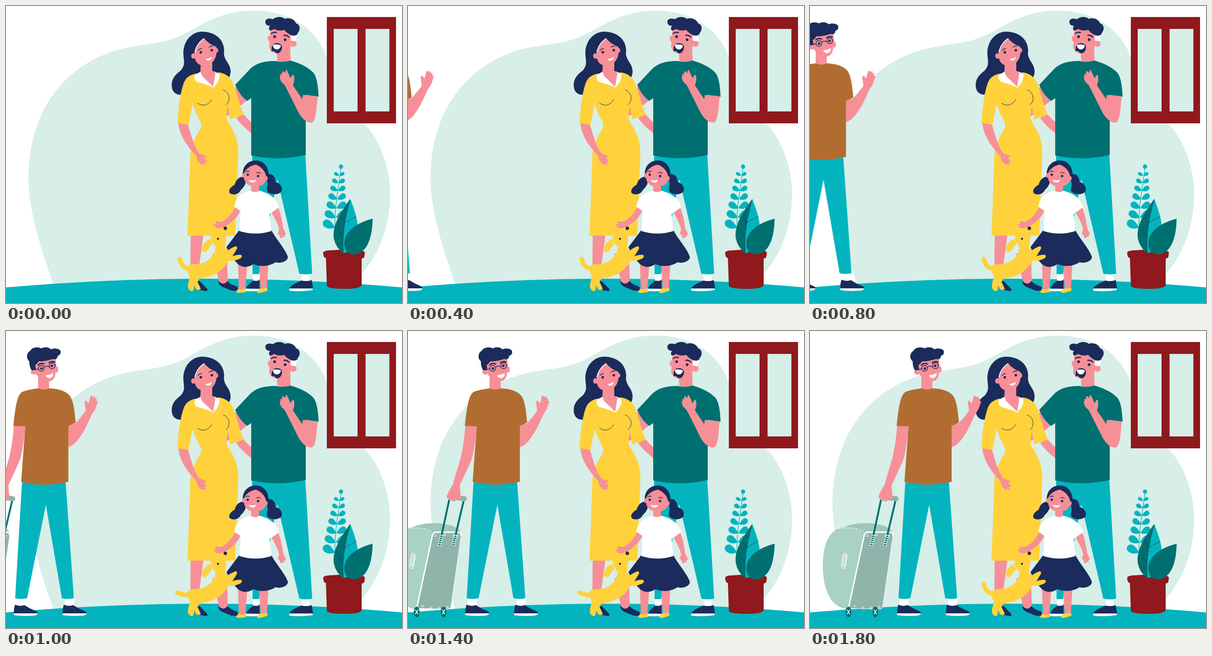
These frames come from a looping animation (864x648 px, 6.8 s). An HTML page:

```html
<!DOCTYPE html>
<html lang="en">
<head>
<meta charset="utf-8">
<title>Family welcome</title>
<style>
html, body { margin: 0; width: 100%; height: 100%; overflow: hidden; background: #fff; }
svg { display: block; width: 100%; height: 100%; }
.mint { fill: #d7eee9; }
.cyan { fill: #03b4be; }
.teal { fill: #006f70; }
.navy { fill: #1b2b5b; }
.red { fill: #8f191c; }
.gold { fill: #ffd23c; }
.brown { fill: #b16d31; }
.white { fill: #fff; }
.skin { fill: #f78f97; }
.sage { fill: #8fb5ab; }
.lid { fill: #9fc6bb; }
.pale { fill: #a9d2c7; }
.line { fill: none; stroke: #1b2b5b; stroke-linecap: round; }
.trim { fill: none; stroke: #fff; }
.tail { fill: none; stroke: #ffd23c; stroke-width: 10; stroke-linecap: round; }
#guest { animation: arrive 6800ms step-end infinite; }
.up { animation: wag-up 6800ms step-end infinite; }
.down { animation: wag-down 6800ms step-end infinite; }
@keyframes arrive {
  0% { transform: translateX(-376px); }
  2.94% { transform: translateX(-352px); }
  5.88% { transform: translateX(-317px); }
  8.82% { transform: translateX(-276px); }
  11.76% { transform: translateX(-230.5px); }
  14.7% { transform: translateX(-173px); }
  17.64% { transform: translateX(-115px); }
  20.58% { transform: translateX(-65px); }
  23.52% { transform: translateX(-22px); }
  26.47%, 100% { transform: translateX(0); }
}
@keyframes wag-up {
  0%, 5.88%, 11.76%, 17.64%, 23.52%, 100% { visibility: visible; }
  2.94%, 8.82%, 14.7%, 20.58% { visibility: hidden; }
}
@keyframes wag-down {
  0%, 5.88%, 11.76%, 17.64%, 23.52%, 100% { visibility: hidden; }
  2.94%, 8.82%, 14.7%, 20.58% { visibility: visible; }
}
</style>
</head>
<body>
<svg viewBox="0 0 864 648" preserveAspectRatio="none">
  <defs>
    <path id="leaf" d="M0 0C-6 4-20 4-25-5C-28-14-18-20-11-14C-5-9-3-4 0 0Z"/>
    <g id="shoe">
      <path class="white" d="M196 582L194 600H214L216 582Z"/>
      <path class="navy" d="M193 597Q203 602 213 598Q225 606 238 611Q242 613 242 616H190Q190 604 193 597Z"/>
      <path class="white" d="M190 616H242Q242 620 234 621Q210 623 190 620Z"/>
    </g>
    <g id="wheel">
      <ellipse class="teal" rx="6.2" ry="11.5"/>
      <path class="trim" stroke-width="1.6" d="M-3-5L3 5M3-5L-3 5"/>
    </g>
  </defs>

  <path class="mint" d="M103 606C80 540 49 450 49 376C49 208 152 106 285 87C325 81 350 79 385 63C430 40 470 10 540 10C630 10 682 60 699 110C712 160 735 215 781 256C820 295 838 360 838 410C838 480 815 540 776 585V610Z"/>
  <path class="cyan" d="M0 614Q432 576 864 614V648H0Z"/>

  <!-- window -->
  <path class="red" d="M700 24H851V256H700Z"/>
  <path class="mint" d="M715 50H767V230H715ZM784.500 50H836.500V230H784.500Z"/>

  <!-- plant -->
  <g id="sprig" class="cyan">
    <path d="M718 484C716 440 726 395 731 352" fill="none" stroke="#03b4be" stroke-width="1.3"/>
    <ellipse cx="731" cy="350.500" rx="4.500" ry="5"/>
  </g>
  <path class="red" d="M692 538Q694 533 710 533Q738 530 765 533Q782 533 783 538L782 547Q780 551 776 551L776 609Q775 617 738 617Q700 617 700 610L698 550Q692 549 692 538Z"/>
  <path class="teal" d="M751 421C730 450 712 478 715 505Q718 525 735 539L748 510Z"/>
  <path class="cyan" d="M751 421C761 445 768 470 767 481C765 502 753 515 744 537L736 539C732 500 742 450 751 421Z"/>
  <path class="line" stroke-width=".8" d="M751 423C742 452 732 500 736 537M738 473L764 459M738 473L731 459M734 504L724 488"/>
  <path class="teal" d="M800 464C768 472 739 490 738 518Q739 541 760 542Q780 540 790 518Q799 500 800 464Z"/>

  <!-- hidden arms -->
  <path class="skin" d="M502 244L518 236Q528 248 536 254V278C522 267 512 258 502 244Z"/>
  <path class="skin" d="M502 176L526 206Q505 223 489 237L478 241V205Z"/>

  <!-- father -->
  <path class="white" d="M539 583H552V600H539ZM644 583H662V600H646Z"/>
  <path class="cyan" d="M537 324H653L668 584Q654 587 640 584L592 378L552 585H538Z"/>
  <path class="navy" d="M524 616Q527 608 540 599Q547 601 553 598V617ZM618 616Q622 608 645 599Q656 602 667 598L670 616Z"/>
  <path class="white" d="M519 617H553V621Q535 624 519 621ZM618 616.500H669V620Q640 624 618 621Z"/>
  <path class="skin" d="M577 48L574 90Q578 102 591 104L592 120Q606 124 621 119L620 94L626 55Z"/>
  <ellipse class="skin" cx="627" cy="82" rx="7" ry="7"/>
  <ellipse class="skin" cx="574" cy="71" rx="3" ry="6"/>
  <path class="white" d="M622 61L634 63Q635 73 630 77L621 75Z"/>
  <path class="navy" d="M566 33C567 28 575 26 582 29C590 22 603 23 608 28C620 24 630 30 633 38C642 40 643 52 637 58C636 64 630 66 623 64Q612 59 607 52Q595 56 585 50Q575 56 574 51Q573 45 577 43C570 44 565 40 566 33Z"/>
  <g class="navy"><circle cx="586" cy="67" r="3"/><circle cx="609" cy="73.500" r="3"/></g>
  <path class="line" stroke-width="2.600" d="M579 60Q584 56 590 58M606 64Q613 63 617 68"/>
  <path class="navy" d="M580 89Q583 81 591 81Q599 81 602 87Q603 99 594 103Q588 104 585 98L579 99Z"/>
  <path class="white" d="M582 85Q591 82 600 86Q598 95 590 95Q583 93 582 85Z"/>
  <path class="teal" d="M588 120C562 120 546 125 533 137L500 172Q510 195 526 207L535 201V326Q595 339 654 325V194L682 198C681 170 677 150 668 143C655 131 640 125 621 119Q604 124 588 120Z"/>
  <path class="skin" d="M611 178L638 232C648 250 660 256 668 254C677 248 677 226 680 197L648 194L646 203L626 173L628 167Q630 158 628 151Q625 148 621 158L613 140Q609 138 610 146L604 142Q601 143 603 149Q597 146 599 153Q596 154 598 159Q600 167 607 171Z"/>

  <!-- mother -->
  <path class="navy" d="M428 56C404 56 386 78 387 105C388 122 392 128 381 141C368 151 360 160 362 178C364 190 374 195 384 193L400 160H470L486 157C492 148 491 136 485 126C478 115 474 108 476 98C476 72 455 56 428 56Z"/>
  <path class="skin" d="M403 498H431L417 601H402ZM450 540H482L484 604Q474 614 465 602Z"/>
  <path class="navy" d="M412 597Q424 599 428 606L439 617Q441 622 436 622L415 618ZM463 599Q463 610 475 614L492 621L503 621.500Q508 618 504 612Q490 608 483 600Q474 612 463 599Z"/>
  <path class="gold" d="M411 148Q394 153 389 165C380 187 376 225 374 256L398 260L407 215Q414 234 424 252Q428 260 424 268C408 295 402 310 402 335L396 501H500L507 320C507 292 496 270 486 256Q479 246 482 234L484 218L489 247L519 237C509 217 505 192 497 172Q490 150 466 145Z"/>
  <path class="skin" d="M376 256C380 290 402 312 415 327L418 338L426 346Q429 348 430 344L434 347Q437 346 433 340Q439 343 437 337L431 330Q438 331 437 327L423 322C412 312 405 285 397 259Z"/>
  <path class="white" d="M414 149C408 155 412 163 418 166Q438 171 452 178Q466 166 466 149L455 143H425Z"/>
  <path class="skin" d="M425 125L424 143L428 153L452 176L457 146L450 141V123Z"/>
  <path class="skin" d="M432 70C422 78 414 91 412 104C410 119 418 130 432 130C450 129 462 116 459 89Q442 83 432 70Z"/>
  <ellipse class="skin" cx="409" cy="109" rx="5" ry="6"/>
  <ellipse class="skin" cx="460" cy="97" rx="3" ry="5"/>
  <path class="trim" stroke-width="1.800" d="M412 102Q415 83 432 71"/>
  <g class="navy"><circle cx="425" cy="101" r="2.800"/><circle cx="449" cy="96.500" r="2.800"/></g>
  <path class="line" stroke-width="1.600" d="M419 97Q422 93 427 93M443 90Q447 86 451 88"/>
  <path class="white" d="M435 116Q443 115 449 111Q448 119 441 119Q437 119 435 116Z"/>
  <path class="line" stroke-width="1" d="M418 212Q436 224 449 204M474 183Q486 187 487 201Q486 212 480 215"/>

  <!-- girl -->
  <path class="skin" d="M506 558H527L522 619H508ZM552 555H573L569 618H556Z"/>
  <path class="gold" d="M507 617Q515 621 523 615L524 624L510 626Q501 626 502 623ZM557 615Q563 618 569 614L571 621L555 626Q545 626 548 622Z"/>
  <path class="navy" d="M509 489L481 526Q490 548 505 562C515 572 528 571 540 563C555 570 575 568 588 559C600 563 616 556 615 547C608 528 590 510 579 489Z"/>
  <path class="skin" d="M579 450L594 440C602 460 603 475 605 486L610 495Q611 501 607 500L608 504Q605 507 604 501L603 506Q598 509 597 500L593 497L596 487C592 472 586 462 579 450Z"/>
  <path class="white" d="M534 403C515 407 503 416 500 430L498 438L512 447L509 491Q545 502 579 491L575 454L596 439C592 420 572 407 552 403Z"/>
  <path class="navy" d="M517 372C514 350 528 337 545 337C562 337 572 350 573 367C582 365 588 374 588 384C600 387 605 398 600 406C592 413 576 412 570 404C567 396 574 390 569 380L521 376C527 387 518 396 512 402C508 411 495 414 488 408C484 402 492 393 499 390C501 380 508 373 517 372Z"/>
  <path class="skin" d="M519 366C523 354 535 348 545 346C556 350 564 358 567 369C568 386 562 391 552 393V404Q544 408 535 404V393C524 390 518 382 519 366Z"/>
  <ellipse class="skin" cx="518" cy="370" rx="3" ry="5"/>
  <ellipse class="skin" cx="566" cy="376" rx="5" ry="5.500"/>
  <g class="navy"><circle cx="527.500" cy="368" r="2.600"/><circle cx="550" cy="371" r="2.600"/></g>
  <path class="line" stroke-width="1.500" d="M523 362Q527 359 531 361M547 364Q551 362 555 365"/>
  <path class="white" d="M529 379Q538 382 546 379Q543 386 537 385Q531 384 529 379Z"/>

  <!-- dog -->
  <path class="tail up" d="M404 573C386 573 383 565 379 552"/>
  <path class="tail down" d="M404 575C391 578 384 574 374 571"/>
  <path class="gold" d="M447 492C445 506 449 518 457 525C458 540 445 557 425 562C412 564 402 562 396 569C395 576 397 582 400 587C402 595 396 604 397 614Q400 623 407 622Q411 618 410 609L415 618Q421 622 425 617L418 602L423 594C445 592 470 584 485 556L498 556L511 551Q517 547 513 543Q505 542 494 546L502 533Q507 526 501 524Q491 528 484 533L478 527L482 492Z"/>
  <path class="gold" d="M446 508C434 512 426 525 428 534Q432 540 438 535Q444 526 450 519Z"/>
  <path class="skin" d="M500 439C491 456 482 465 470 471L458 470Q455 473 461 475L453 476Q450 479 459 479Q452 482 457 483Q463 488 478 481C492 473 505 462 511 447Z"/>
  <circle cx="478.500" cy="485" r="3.800" fill="#222a45"/>
  <circle cx="462.500" cy="508" r="2.200" fill="#222a45"/>

  <!-- visitor with suitcase -->
  <g id="guest">
    <path class="lid" d="M75 428C100 415 165 415 180 438L175 470L110 450Z"/>
    <path class="pale" d="M75 428C46 430 28 458 28 511C28 565 45 605 85 607L125 450Q112 430 75 428Z"/>
    <path class="trim" stroke-width="1.300" stroke-dasharray="5 3" d="M60 431Q95 426 117 438"/>
    <path class="sage" d="M126 439H175Q182 440 181 447L159 600Q158 607 150 607L84 605L118 447Q120 439 126 439Z"/>
    <path class="trim" stroke-width="3" d="M84 605L118 447Q120 439 126 439H175Q182 440 181 447"/>
    <path class="trim" stroke-width="1.200" d="M84 605L150 607Q158 607 159 600L181 447"/>
    <g class="trim" transform="rotate(9 75 502)" stroke-width="1.400">
      <rect x="70" y="485" width="9" height="33" rx="4.500"/><rect x="73" y="489" width="4" height="24" rx="2"/>
    </g>
    <path d="M155 368L133 470M187 368L163 470" fill="none" stroke="#006f70" stroke-width="4"/>
    <path class="trim" stroke-width="8" stroke-dasharray="1.600 3" d="M138.500 445L133 470M169 445L163 470"/>
    <g id="rivets" class="trim"></g>
    <path d="M155 361L188 366" fill="none" stroke="#8fb5ab" stroke-width="11" stroke-linecap="round"/>
    <use href="#wheel" x="84" y="613"/><use href="#wheel" x="142.500" y="613"/>

    <use href="#shoe"/><use href="#shoe" x="106.500"/>
    <path class="cyan" d="M208 328L193 583Q206 586 219 583L260 379L295 583Q308 586 321 583L303 328Z"/>
    <path class="skin" d="M190 206C188 240 183 262 181 272C175 295 168 315 163 335Q158 342 151 357Q149 362 154 363Q152 368 157 367Q159 373 163 370Q166 376 169 369L172 361L176 368Q182 368 180 360L178 337C188 315 198 295 205 277Q213 240 215 207Z"/>
    <path class="skin" d="M308 205L324 202Q338 187 347 174L345 160Q343 152 348 152L353 158L357 143Q361 138 362 145Q367 138 367 147Q372 145 370 152Q375 152 372 158L368 170Q364 177 360 182C350 206 338 230 325 243Q315 253 308 253Z"/>
    <path class="skin" d="M237 84C236 72 243 64 250 65L281 58C283 75 283 90 279 101Q275 109 267 110V126Q255 131 243 127V100Q238 95 237 84Z"/>
    <ellipse class="skin" cx="234" cy="90" rx="7" ry="5"/>
    <ellipse class="skin" cx="284" cy="84" rx="3" ry="7"/>
    <path class="navy" d="M229 86C224 78 224 70 224 66C216 60 218 47 226 43C230 35 243 34 250 38C258 33 268 36 271 40C280 36 293 40 292 45C293 50 290 53 286 54C285 61 281 63 275 61Q258 67 245 66L237 75L238 85Z"/>
    <g class="line" stroke-width="1.400">
      <circle cx="250" cy="81.500" r="6.300"/><circle cx="273.500" cy="76" r="6.300"/>
      <path d="M256 79Q261 75 267 78M237 84L244 82.500M280 75L282 74"/>
    </g>
    <g class="navy"><circle cx="250.500" cy="82" r="2.800"/><circle cx="273" cy="76" r="2.800"/></g>
    <path class="line" stroke-width="2.800" d="M243 74Q249 69 256 72M267 69Q273 65 279 68"/>
    <path class="white" d="M259 97Q268 96 276 92Q277 100 269 103Q262 103 259 97Z"/>
    <path class="brown" d="M243 125Q220 128 208 133C198 140 194 160 189 207L215 208L206 329Q255 342 309 329V207L325 200C322 165 318 145 309 138Q295 126 267 125Q255 131 243 125Z"/>
  </g>
</svg>
<script>
const NS = "http://www.w3.org/2000/svg";
function add(parent, tag, attrs) {
  const el = document.createElementNS(NS, tag);
  for (const key in attrs) el.setAttribute(key, attrs[key]);
  document.getElementById(parent).append(el);
}
for (let i = 0; i < 7; i++) {
  const x = 718 + 1.5 * i, y = 483 - 22.5 * i + 0.6 * i * i, s = 1.05 - 0.1 * i;
  for (const side of i ? [1, -1] : [1])
    add("sprig", "use", { href: "#leaf", transform: `translate(${x} ${y}) scale(${s * side} ${s})` });
}
const rivets = [[125, 447], [145, 445], [165, 446], [173, 447], [97, 600], [115, 604], [133, 604], [151, 602]];
for (const [cx, cy] of rivets) add("rivets", "circle", { cx, cy, r: 1.8 });
</script>
</body>
</html>
```
